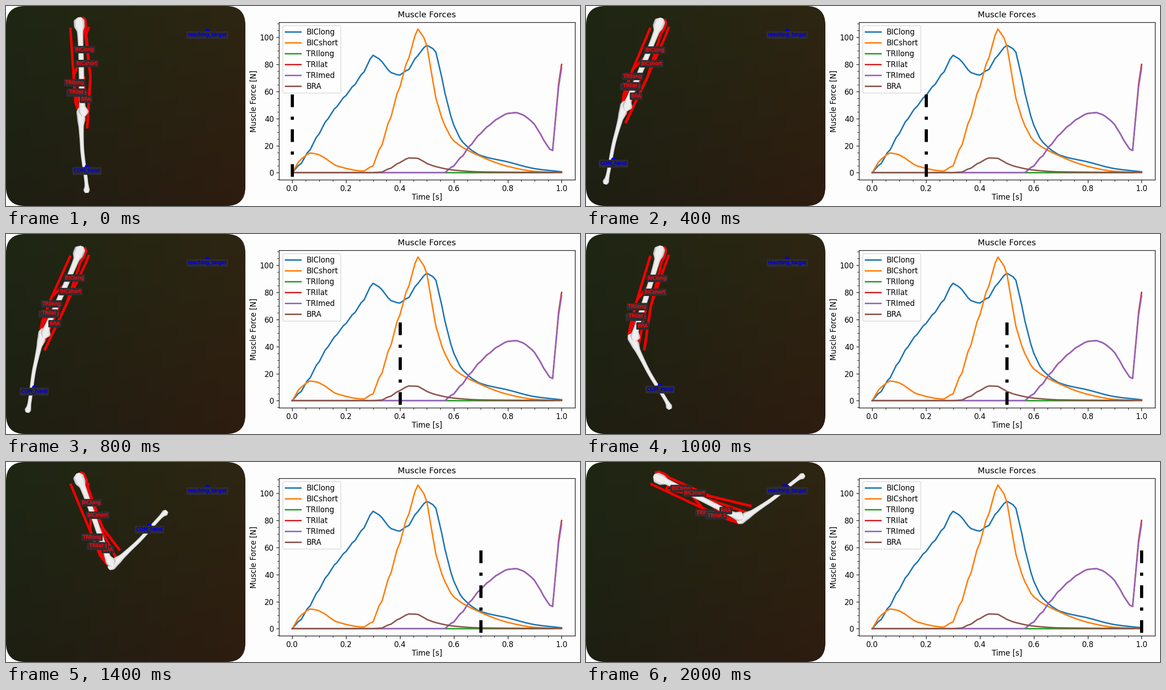
These frames come from a looping animation (1266x442 px, 2200 ms). A matplotlib script:

```python
import numpy as np
import matplotlib.pyplot as plt
from matplotlib.animation import FuncAnimation
from matplotlib.patches import Circle, FancyBboxPatch, Polygon
from matplotlib.patheffects import withStroke
from matplotlib.ticker import AutoMinorLocator, MultipleLocator

W, H, FRAMES, STEP_MS = 1266, 442, 11, 200
PT = 0.72  # points per pixel at 100 dpi
PAPER = "#fdfdfd"
RED, BLUE, TAG = "#ee0a0e", "#0000e0", "#2f2c2f"
plt.rcParams["font.family"] = "DejaVu Sans"

fig = plt.figure(figsize=(W / 100, H / 100), dpi=100, facecolor=PAPER)


def glide(keys, x):
    """Smooth curve through (x, y) keys that never overshoots them."""
    k, v = np.array(keys, float).T
    h = np.diff(k)
    s = np.diff(v) / h
    same = s[:-1] * s[1:] > 0
    total = np.where(same, s[:-1] + s[1:], 1)
    d = np.r_[s[0], np.where(same, 2 * s[:-1] * s[1:] / total, 0), s[-1]]
    i = np.clip(np.searchsorted(k, x, "right") - 1, 0, len(h) - 1)
    u = (x - k[i]) / h[i]
    blend = u * u * (3 - 2 * u)
    return (v[i] + (v[i + 1] - v[i]) * blend
            + h[i] * u * (1 - u) * (d[i] * (1 - u) - d[i + 1] * u))


# ---------------------------------------------------------------- chart
X0, XS, Y0, YS = 631.4, 594, 368.4, 2.99
L, R, T, B = 602, 1255, 36.4, 384.4
TICKS = 30  # control steps per second


def force(*keys):
    """Force over time; each rising step is steep first, then flatter."""
    k = np.arange(TICKS + 1)
    v = glide(keys, k)
    rise = np.diff(v)
    knee = np.where(rise > 0, v[:-1] + 0.77 * rise, glide(keys, k[:-1] + 2 / 3))
    t = np.r_[k, k[:-1] + 2 / 3]
    order = np.argsort(t)
    return t[order] / TICKS, np.r_[v, knee][order]


def triceps(peak):
    return force((0, 0), (17, 0), (18, 5), (21, 29), (23, 40.3), (24, 43.8),
                 (25, 44.4), (26, 41.5), (27, 35.5), (29, 16.4), (30, peak))


SERIES = (
    ("BIClong", "#1f77b4", force(
        (0, 0), (1, 6.8), (2, 17), (4, 40), (8, 74.5), (9, 86.8), (10, 82),
        (11, 74), (12, 72.2), (13, 76.3), (15, 94.2), (16, 89), (17, 59),
        (18, 35), (19, 22.5), (21, 12.7), (24, 8), (27, 3), (30, .7))),
    ("BICshort", "#ff7f0e", force(
        (0, 0), (1, 10), (2, 14.6), (3, 13.2), (5, 5), (8, 1.2), (9, 5),
        (10, 20.5), (12, 63.5), (13, 85), (14, 106.2), (15, 93.6), (16, 55),
        (17, 34.8), (18, 23.5), (21, 12), (24, 4.7), (27, 1), (30, .1))),
    ("TRIlong", "#2ca02c", force((0, 0), (29, 0), (30, .6))),
    ("TRIlat", "#d62728", triceps(80)),
    ("TRImed", "#9467bd", triceps(77.3)),
    ("BRA", "#8c564b", force(
        (0, 0), (9, 0), (10, .5), (12, 7.5), (13, 10.9), (14, 10.6),
        (15, 6.8), (16, 4.5), (18, 1.9), (21, .6), (30, .1))),
)

chart = fig.add_axes([L / W, 1 - B / H, (R - L) / W, (B - T) / H],
                     facecolor=PAPER)
chart.set_xlim((L - X0) / XS, (R - X0) / XS)
chart.set_ylim((Y0 - B) / YS, (Y0 - T) / YS)
chart.xaxis.set_major_locator(MultipleLocator(0.2))
chart.yaxis.set_major_locator(MultipleLocator(20))
for axis in (chart.xaxis, chart.yaxis):
    axis.set_minor_locator(AutoMinorLocator(4))
chart.tick_params(which="major", length=6.5 * PT, width=1.3 * PT,
                  labelsize=16.5 * PT)
chart.tick_params(which="minor", length=3.8 * PT, width=1 * PT)
chart.tick_params(axis="x", pad=4.2 * PT)
chart.tick_params(axis="y", pad=4.5 * PT)
for spine in chart.spines.values():
    spine.set_linewidth(1.3 * PT)
for _, color, (t, newtons) in SERIES:
    chart.plot(t, newtons, color=color, lw=3.2 * PT, solid_joinstyle="round")

# ---------------------------------------------------------------- stage in pixels
stage = fig.add_axes([0, 0, 1, 1], zorder=2)
stage.axis("off")


def rounded(x0, y0, x1, y1, r, **kw):
    box = FancyBboxPatch((x0, y0), x1 - x0, y1 - y0, mutation_aspect=1,
                         boxstyle=f"round,pad=0,rounding_size={r}", **kw)
    return stage.add_patch(box)


gx, gy = np.meshgrid(np.linspace(0, 1, 132), np.linspace(0, 1, 110))
gx, gy = gx[..., None], gy[..., None]
tl, tr, bl, br = np.array([[30, 39, 20], [45, 38, 18],
                           [29, 31, 18], [46, 28, 16]]) / 255
shade = (tl * (1 - gx) + tr * gx) * (1 - gy) + (bl * (1 - gx) + br * gx) * gy
panel = stage.imshow(shade, extent=(0, 528, H, 0), aspect="auto",
                     interpolation="bilinear")
panel.set_clip_path(rounded(0, 0, 528, H, 42, fc="none", ec="none"))
stage.set_xlim(0, W)
stage.set_ylim(H, 0)

stage.text(928.5, 25.4, "Muscle Forces", size=18.4 * PT, ha="center")
stage.text(928.5, 427.4, "Time [s]", size=16.5 * PT, ha="center")
stage.text(547, 210.4, "Muscle Force [N]", size=16.5 * PT, rotation=90,
           ha="center", va="center")

rounded(610.5, 43.5, 738.5, 192.5, 3.3, fc="white", ec="#cccccc",
        lw=1.4 * PT, alpha=0.8)
for i, (name, color, _) in enumerate(SERIES):
    y = 57.4 + 24 * i
    stage.plot([616, 650], [y, y], color=color, lw=3.2 * PT)
    stage.text(662.4, y + 6, name, size=16.5 * PT)

cursor, = stage.plot([], [], color="black", lw=7 * PT, zorder=5,
                     dashes=(4, 3, 1, 3), dash_capstyle="butt")

# ---------------------------------------------------------------- arm
SHOULDER = np.array([160, 38])
UPPER = 199
TARGET = (444, 55)

# joint angles in degrees from straight down, keyed by time step
STEPS = np.arange(FRAMES)
THETA = np.radians(glide([(0, 3), (2, -20.8), (3, -24.5), (6, -6.4), (7, 21),
                          (8, 51.9), (10, 65)], STEPS))
PHI = np.radians(glide([(0, 2.5), (2, -15.5), (3, -21), (4, -12.6), (6, 83.3),
                        (7, 133), (8, 157.7), (10, 123.7)], STEPS))

# anchors on the upper arm: distance from shoulder, distance to the front
ANCHORS = {"BIClong": (50, 10.5), "BICshort": (81, 14), "TRIlong": (122, -15),
           "BRA": (160, 8), "TRImed": (145, -11), "TRIlat": (143, -12.5)}
HAND = (119, 3)

# bone profiles: distance along, centre line, half width
HUMERUS = [(-13, 3, 4), (-5, 1.5, 12), (6, 1.5, 12), (20, 2.5, 7), (60, 2, 6),
           (160, -1, 6), (182, -1.5, 7), (196, 1, 11), (206, 1, 4)]
FOREARM = [(-12, -6, 4), (-3, -6, 9), (12, -5, 9), (30, -6, 6), (70, -6, 4.5),
           (150, 0, 4.2), (160, .5, 5.2), (167, 0, 7), (173, 0, 4)]


def place(origin, angle, pts):
    """Limb coordinates (along, towards the front) to pixels."""
    s, c = np.sin(angle), np.cos(angle)
    return origin + np.atleast_2d(pts) @ np.array([[s, c], [c, -s]])


live = []


def add(artist):
    live.append(artist)
    return artist


def bone(origin, angle, profile, z, scale=1):
    p = np.array(profile)
    u = np.linspace(p[0, 0], p[-1, 0], 120)
    mid, half = (glide(p[:, [0, c]], u) for c in (1, 2))
    for k, color in ((1, "#b4b4b4"), (.84, "#d6d6d6"), (.62, "#eeeeee")):
        back = np.column_stack([u * scale, mid - half * k])
        front = np.column_stack([u * scale, mid + half * k])
        outline = place(origin, angle, np.vstack([back, front[::-1]]))
        add(stage.add_patch(Polygon(outline, fc=color, ec="none", zorder=z)))


def muscle(*parts):
    pts = np.vstack(parts)
    add(stage.plot(*pts.T, color="#f20000", lw=5.6 * PT, zorder=6,
                   solid_capstyle="butt", solid_joinstyle="round")[0])


def tag(point, name, color, z):
    x, y = point
    add(stage.text(x, y + 9, name, color=color, size=10.8 * PT, zorder=z,
                   ha="center", va="center",
                   path_effects=[withStroke(linewidth=.4, foreground=color)],
                   bbox=dict(boxstyle="round,pad=0.3,rounding_size=0.2",
                             fc=TAG, ec="none")))


def site(point, name, z):
    add(stage.add_patch(Circle(point, 5, fc=BLUE, ec="none", zorder=9)))
    tag(point, name, BLUE, z)


def draw_arm(n):
    th, ph = THETA[n], PHI[n]
    elbow = place(SHOULDER, th, (UPPER, 0))[0]

    def up(*pts):
        return place(SHOULDER, th, pts)

    def fore(*pts):
        return place(elbow, ph, pts)

    belly = up((120, 11 + 9 * np.clip(1 - (ph - th) / 1.6, 0, 1)))
    bic_end, tri_end = fore((34, 7)), fore((-8, -11))
    muscle(up((-13, 9), (-7, 15), (8, 16), (20, 13)), belly, bic_end)
    muscle([(183, 46), (177, 62)], belly, bic_end)
    muscle([(142, 48)], up((120, -17), (175, -16)), tri_end)
    muscle(up((82, -2), (116, -17), (175, -15)), tri_end)
    muscle(up((115, 0), (175, -12)), tri_end)
    muscle(up((118, 6)), fore((17, 2)))
    bone(elbow, ph, FOREARM, 7, .995 + .025 * np.cos(ph))
    bone(SHOULDER, th, HUMERUS, 8)

    for z, (name, anchor) in enumerate(ANCHORS.items(), 10):
        tag(up(anchor)[0], name, RED, z)
    site(fore(HAND)[0], "COM_hand", 16)


def update(n):
    while live:
        live.pop().remove()
    x = X0 + XS * n / (FRAMES - 1)
    cursor.set_data([x, x], [377.2, 194.8])
    draw_arm(n)
    site(TARGET, "reaching_target", 17)
    return live


anim = FuncAnimation(fig, update, frames=FRAMES, interval=STEP_MS,
                     repeat=True, repeat_delay=0, blit=False)
plt.show()
```
